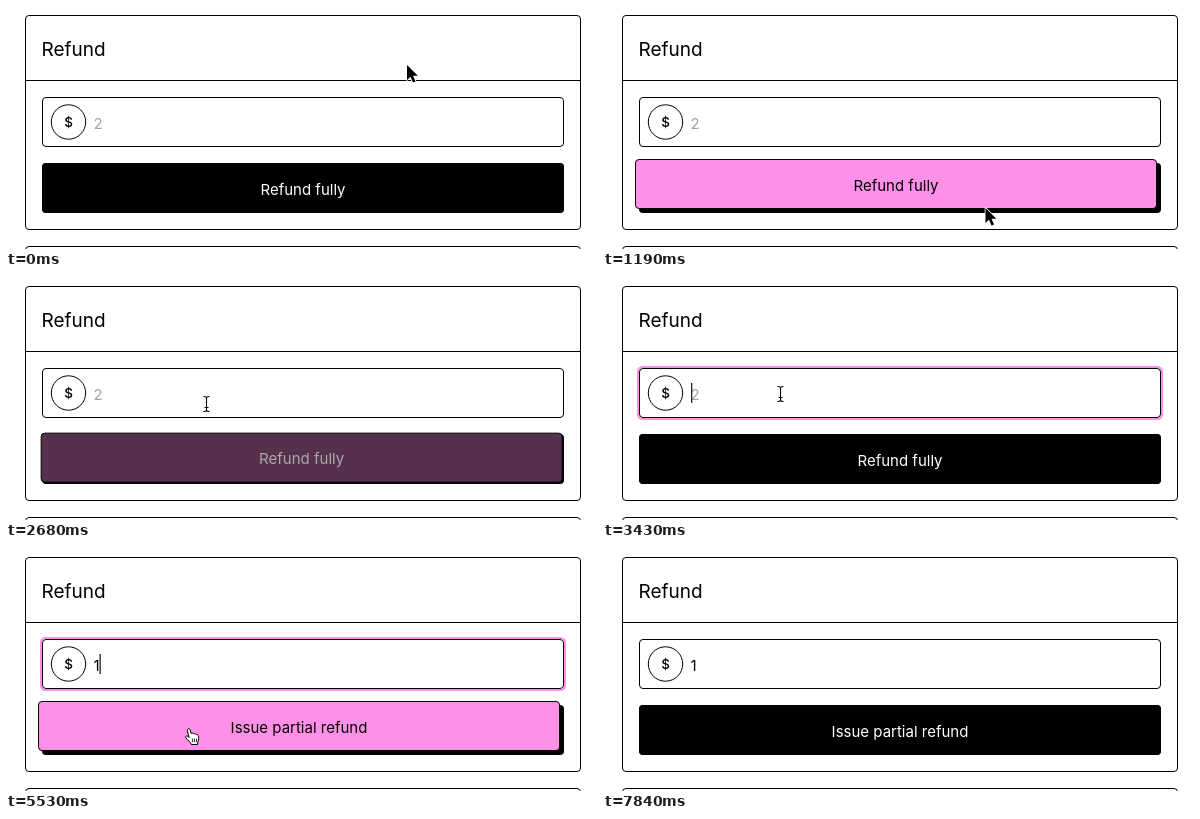
Recreate the animation shown at these times as an HTML page. Size 591 by 243 pixels, loop 7940 ms.

```html
<!DOCTYPE html>
<html lang="en">
<head>
<meta charset="utf-8">
<title>Refund form</title>
<style>
  html, body { margin: 0; width: 100%; height: 100%; overflow: hidden; background: #fff; }
  svg { display: block; width: 100%; height: 100%; }
  text { font: 15px Inter, "Open Sans", sans-serif; }
  .line { fill: none; stroke: #000; }
  .halo { fill: none; stroke: #fff; stroke-width: 2.6; }
</style>
</head>
<body>
<svg viewBox="0 0 591 243">
  <rect width="591" height="243" fill="#fff"/>
  <rect class="line" x="19.5" y="9.5" width="555" height="214" rx="3.5"/>
  <rect class="line" x="19.5" y="240.5" width="555" height="40" rx="3.5"/>
  <path class="line" d="M20 74.5H574"/>
  <text x="35.5" y="50" style="font-size:19px">Refund</text>

  <rect id="ring" x="35" y="90" width="524" height="52" rx="4.5" fill="none" stroke="#ff90e8" stroke-width="2"/>
  <rect class="line" x="36.5" y="91.5" width="521" height="49" rx="3.5"/>
  <circle class="line" cx="62.5" cy="116" r="17.2"/>
  <text x="62.5" y="121" text-anchor="middle" style="font-size:13.5px;font-weight:500">$</text>
  <text id="value" x="87.5" y="122.5"></text>
  <rect id="caret" y="106" width="1.3" height="20" fill="#222"/>

  <rect x="36" y="157" width="522" height="50" rx="4"/>
  <g id="button">
    <rect id="face" x="36.5" y="157.5" width="521" height="49" rx="3.5" stroke="#000"/>
    <text id="label" x="297" y="188.5" text-anchor="middle"></text>
  </g>

  <g id="arrow">
    <path d="M0 0V15L3.5 11.8L6 17.6L8.5 16.5L6 10.8H10.8Z" stroke="#fff" stroke-width="1.6" stroke-linejoin="round" paint-order="stroke"/>
  </g>
  <g id="hand">
    <path transform="translate(-4 -1)" fill="#fff" stroke="#000" stroke-linejoin="round" d="M3.2 1.6C4 .6 5.3 1 5.6 2.2L6.6 6C7.2 5.2 8.6 5.4 9 6.4C9.8 5.7 11 6 11.4 7C12.4 6.5 13.6 7 13.8 8.2C14.3 10.6 14.4 12 13.4 14L13 17H6.8C6 14.6 3 12.6 1.2 10.2C.4 8.9 2 7.9 3.2 8.8L4.6 10L2.9 3.2C2.8 2.6 2.9 2 3.2 1.6Z"/>
    <path class="line" stroke-width=".8" d="M3.9 10v3.6M5.9 10v3.6M7.9 10v3.6"/>
  </g>
  <g id="beam">
    <path class="halo" d="M-3-7.5Q0-7.5 0-6Q0-7.5 3-7.5M0-6V6M-3 7.5Q0 7.5 0 6Q0 7.5 3 7.5"/>
    <path class="line" stroke-width="1.1" d="M-3-7.5Q0-7.5 0-6Q0-7.5 3-7.5M0-6V6M-3 7.5Q0 7.5 0 6Q0 7.5 3 7.5M-2 3.5H2"/>
  </g>
</svg>
<script>
const LOOP = 7940, FOCUS = 3430, TYPED = 4480, BLUR = 7840;
const PINK = [255, 144, 232];
const CARET_ON = [[FOCUS, 4030], [TYPED, 4930], [5380, 5970], [6420, 6870], [7470, BLUR]];

// Pointer poses: start time, pointer kind, hotspot x and y, button hover amount
const POSES = [
  [0, 'arrow', 401, 59, 0],
  [750, 'arrow', 398, 78, 0],
  [900, 'beam', 390, 128, 0],
  [1040, 'hand', 384, 176, .5],
  [1190, 'arrow', 382.5, 202, 1],
  [1340, 'hand', 384, 198, 1],
  [1490, 'hand', 387, 191, 1],
  [1630, 'hand', 389, 186, 1],
  [1780, 'hand', 390.5, 183.5, 1],
  [1930, 'hand', 378, 186, 1],
  [2080, 'hand', 354, 185, 1],
  [2230, 'hand', 344, 179, 1],
  [2530, 'hand', 280, 161, 1],
  [2680, 'beam', 200.5, 127, .337],
  [2830, 'beam', 181, 119, 0],
  [2980, 'beam', 177.5, 117, 0],
  [5230, 'beam', 178, 126, 0],
  [5380, 'hand', 181, 172, .4],
  [5530, 'hand', 182.5, 180.5, 1],
  [6420, 'hand', 186, 164, 1],
  [6570, 'beam', 190, 132, .337],
  [6720, 'beam', 192, 121, 0],
  [6870, 'beam', 192, 118, 0],
  [BLUR, 'none', 0, 0, 0]
];

const $ = id => document.getElementById(id);
const show = (id, on) => $(id).setAttribute('visibility', on ? 'visible' : 'hidden');
const attr = (id, name, value) => $(id).setAttribute(name, value);
const rgb = channels => `rgb(${channels.map(Math.round)})`;

function drawPointer(kind, x, y) {
  for (const id of ['arrow', 'hand', 'beam']) show(id, id === kind);
  if (kind !== 'none') attr(kind, 'transform', `translate(${x} ${y})`);
}

function drawButton(hover, text) {
  const lift = -4 * hover, ink = 255 * (1 - hover);
  attr('button', 'transform', `translate(${lift} ${lift})`);
  attr('face', 'fill', rgb(PINK.map(c => c * hover)));
  attr('label', 'fill', rgb([ink, ink, ink]));
  $('label').textContent = text;
}

function drawField(t, typed) {
  show('ring', t >= FOCUS && t < BLUR);
  show('caret', CARET_ON.some(([on, off]) => t >= on && t < off));
  attr('caret', 'x', typed ? 93.5 : 88);
  attr('value', 'fill', typed ? '#000' : '#a3a3a3');
  $('value').textContent = typed ? '1' : '2';
}

function render(t) {
  const typed = t >= TYPED;
  const [, kind, x, y, hover] = POSES.findLast(pose => pose[0] <= t);
  drawField(t, typed);
  drawButton(hover, typed ? 'Issue partial refund' : 'Refund fully');
  drawPointer(kind, x, y);
}

const start = performance.now();
function tick() {
  render((performance.now() - start) % LOOP);
  requestAnimationFrame(tick);
}
tick();
</script>
</body>
</html>
```
